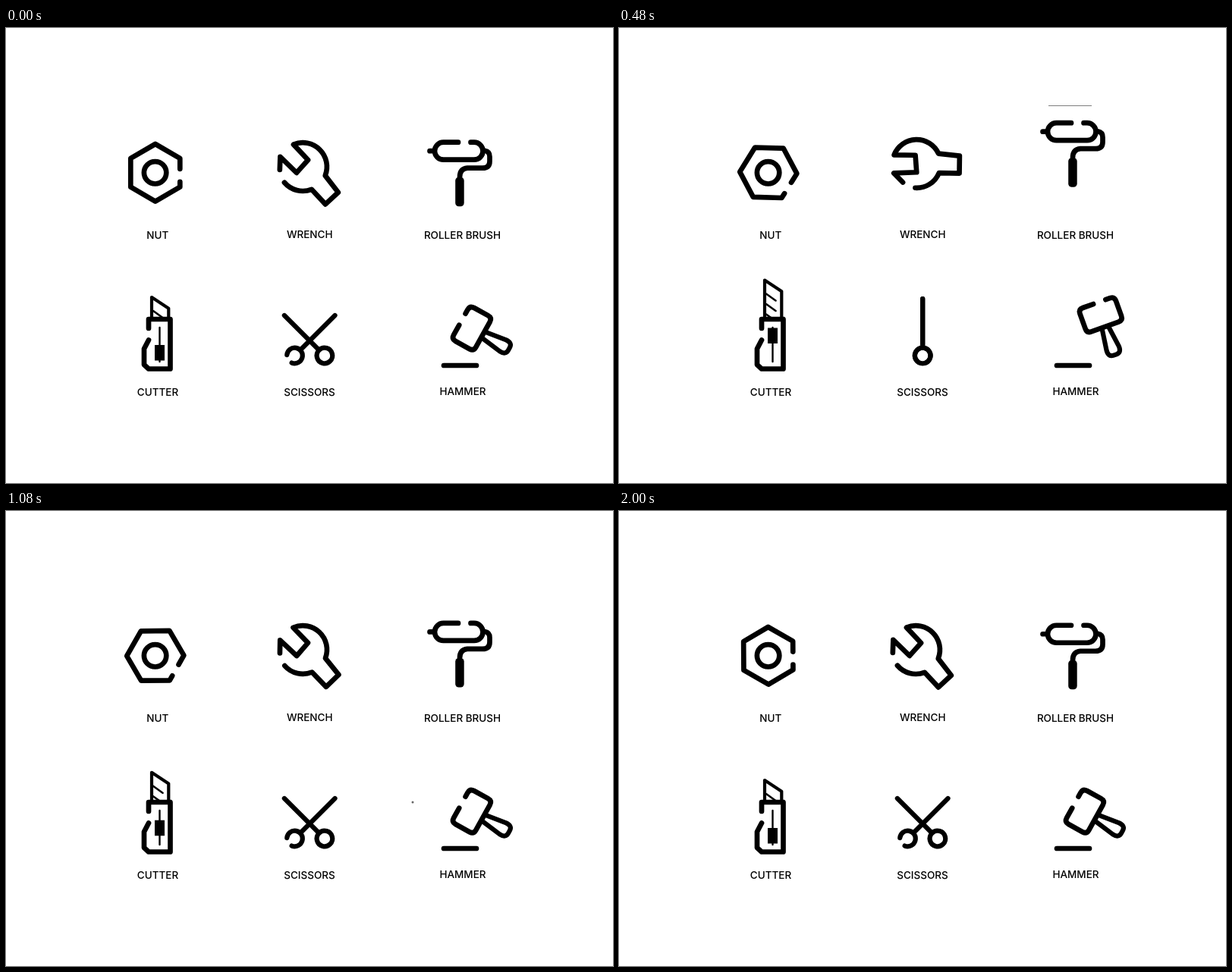
Recreate the animation shown at these times as an HTML page. Size 800 by 600 pixels, loop 2.04 s.

```html
<!DOCTYPE html>
<html lang="en">
<head>
<meta charset="utf-8">
<title>Tool icons</title>
<style>
  html, body { margin: 0; width: 100%; height: 100%; overflow: hidden; background: #fff; }
  svg { display: block; width: 800px; height: 600px; }
  .line { fill: none; stroke: #000; stroke-width: 6.7; stroke-linecap: round; stroke-linejoin: round; }
  .slim { stroke-width: 6.2; }
  .solid { fill: #000; stroke: none; }
  text { font: 500 13.5px Inter, "Noto Sans", sans-serif; text-anchor: middle; }
</style>
</head>
<body>
<svg viewBox="0 0 800 600">
  <defs><clipPath id="sleeve"><rect x="180" y="300" width="50" height="83"/></clipPath></defs>

  <g class="line">
    <path id="nut" d="M32.5 -5V-18.9L0 -37.8L-32.5 -18.9V18.9L0 37.8L32.5 18.9V12"/>
    <circle cx="196.6" cy="190.8" r="14.7"/>
  </g>

  <path id="wrench" class="line" d="M-12.5 24L-24.5 12L5.5 10.5L3.5 -12H-24.5A31.8 31.8 0 0 1 34 -14.5L61.8 -12V11H35A31.8 31.8 0 0 1 4 31"/>

  <rect id="paint" x="566" width="57"/>
  <g id="roller" class="line">
    <path d="M596 151H576.5a11.5 11.5 0 0 0 0 23H617a11.5 11.5 0 0 0 0 -23H612.5M558.5 162.5H565"/>
    <path d="M631 162Q637.5 163 637.5 170V176Q637.5 185 628 185H608Q598 186 598 197"/>
    <rect class="solid" x="592.2" y="197" width="11.5" height="38.5" rx="4.5"/>
  </g>

  <g class="line">
    <g clip-path="url(#sleeve)">
      <g id="blade">
        <path d="M192 420V355L214.3 369.8V420" stroke-width="4.2"/>
        <path d="M194 373l12.5 9m-12.5 4.5l12.5 9m-12.5 4.5l12.5 9" stroke-width="2.6"/>
      </g>
    </g>
    <path d="M188 396V384H216.5V449.5H188L182 444V423L188 411.5"/>
    <path d="M202.5 395V440" stroke-width="2.4"/>
    <rect id="knob" class="solid" x="196" y="418" width="13" height="20.5"/>
  </g>

  <g class="line slim">
    <path id="bladeL" d="M0 -75V-10.3M-7.9 6.6A10.3 10.3 0 1 1 4 9.5"/>
    <path id="bladeR" d="M0 -75V-10.3a10.3 10.3 0 1 1 -.01 0"/>
  </g>

  <g class="line">
    <path id="ground"/>
    <g id="hammer">
      <path d="M-55.7 -13V-19q0 -6.2 6.2 -6.2h21q6.2 0 6.2 6.2v38q0 6.2 -6.2 6.2h-21q-6.2 0 -6.2 -6.2V4.3"/>
      <path class="slim" d="M-21 -4.5L8 -8.6q9 -.6 9 6.6v4q0 7.2 -9 6.6L-21 4.5"/>
    </g>
  </g>
  <circle id="chip"/>

  <text x="199.7" y="278">NUT</text>
  <text x="400.2" y="277">WRENCH</text>
  <text x="601.5" y="278">ROLLER BRUSH</text>
  <text x="200" y="484.5">CUTTER</text>
  <text x="400" y="484.5">SCISSORS</text>
  <text x="602" y="483.5">HAMMER</text>
</svg>
<script>
const LOOP = 2040, STEP = 40;
const $ = id => document.getElementById(id);
const place = (id, x, y, turn = 0) =>
  $(id).setAttribute('transform', `translate(${x} ${y}) rotate(${turn})`);
const set = (id, attrs) => {
  for (const k in attrs) $(id).setAttribute(k, attrs[k]);
};

const linear = (t, a, b) => Math.min(1, Math.max(0, (t - a) / (b - a)));
const ease = (t, a, b) => {
  const u = linear(t, a, b);
  return u * u * (3 - 2 * u);
};
// Rises from 0 to 1 during a..b and falls back during c..d.
const pulse = (t, a, b, c, d) => ease(t, a, b) - ease(t, c, d);

// Released spring: starts at 1 and swings to 0, each half swing shrinking by `keep`.
function spring(t, half, keep) {
  if (t <= 0) return 1;
  const x = Math.PI * t / half, r = -Math.log(keep) / Math.PI;
  return Math.exp(-r * x) * (Math.cos(x) + r * Math.sin(x));
}

function drawNut(t) {
  const swing = start => spring(t - start, 324, .243);
  place('nut', 196.8, 190.8, 30 * (swing(1060) - swing(0)));
}

function drawWrench(t) {
  place('wrench', 386.9, 179.7, 47 - 77 * (linear(t, 0, 800) - ease(t, 800, 1100)));
}

function drawRoller(t) {
  place('roller', 0, -26 * ease(t, 0, 440) * spring(t - 460, 330, .34) - .3);
  const edge = (a, b) => 102.4 + 50.6 * ease(t, a, b);
  const top = edge(560, 940);
  set('paint', { y: top, height: edge(460, 800) - top });
}

function drawCutter(t) {
  const y = -22.5 * pulse(t, 0, 180, 900, 1240);
  place('blade', 0, y);
  place('knob', 0, y);
}

function drawScissors(t) {
  const open = 1 - pulse(t, 0, 180, 520, 760);
  place('bladeL', 400.2 - 19.7 * open, 432, 45 * open);
  place('bladeR', 400.2 + 19.7 * open, 432, -45 * open);
}

function drawHammer(t) {
  const lift = pulse(t, 0, 600, 600, 760), blow = pulse(t, 600, 760, 820, 1080);
  place('hammer', 648 - 13 * blow, 415 - 7.5 * blow, 29 + 46 * lift - 38 * blow);

  const spread = 10 * pulse(t, 700, 780, 820, 960);
  set('ground', { d: `M${577 - spread} 445H${620 + spread}` });

  // A chip flies off to the left after the blow.
  const u = (t - 800) / 280, flying = t >= 780 && t < 1120;
  set('chip', { cx: 570 - 34 * u, cy: 436 - 52 * u, r: flying ? 2.1 - .6 * u : 0, opacity: .95 - .35 * u });
}

const parts = [drawNut, drawWrench, drawRoller, drawCutter, drawScissors, drawHammer];
const start = performance.now();
function tick() {
  const t = (performance.now() - start) % LOOP;
  const held = Math.floor(t / STEP) * STEP;
  parts.forEach(draw => draw(held));
  requestAnimationFrame(tick);
}
tick();
</script>
</body>
</html>
```
